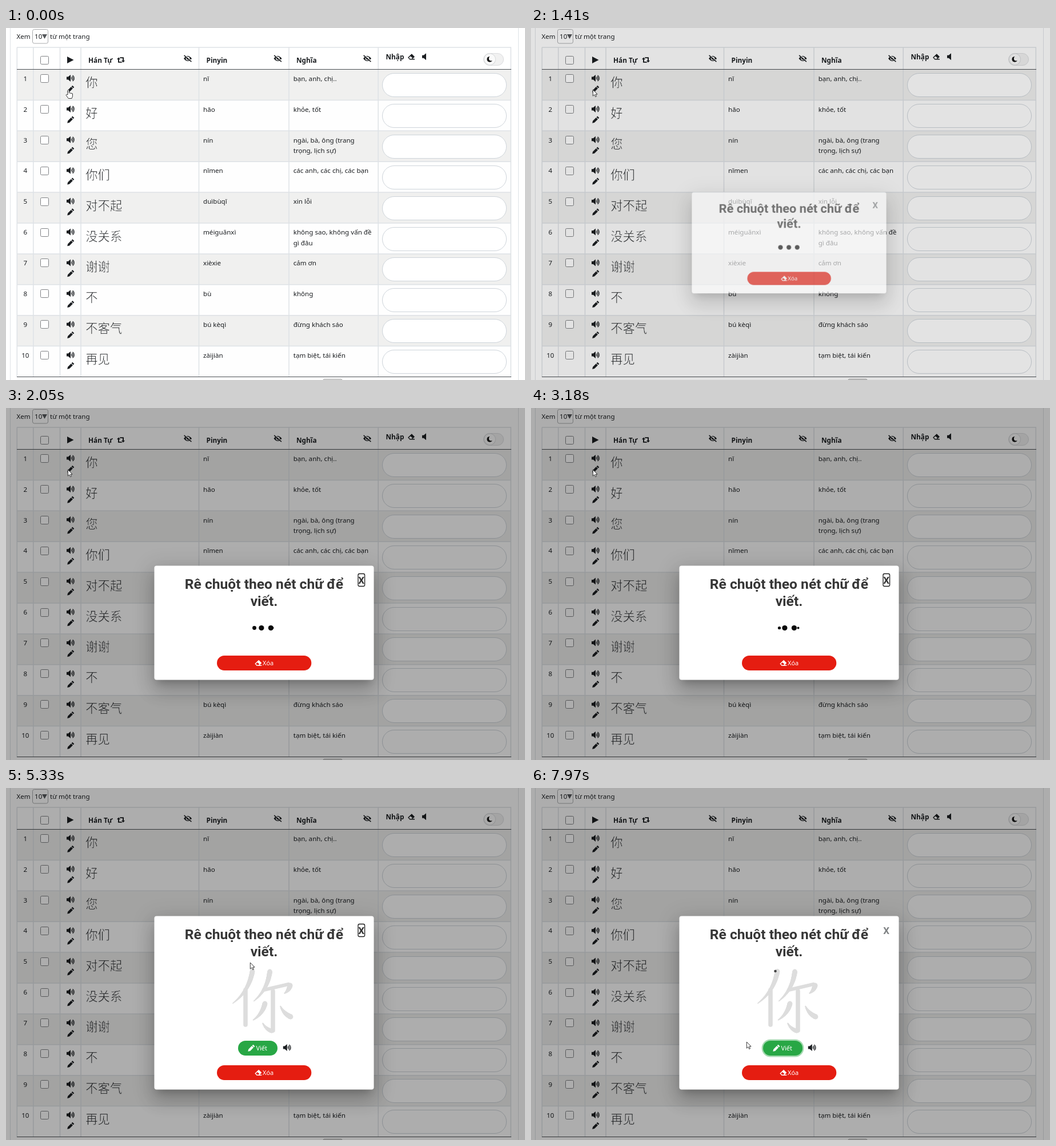
These frames come from a looping animation (908 by 617 pixels, 7990 ms). An HTML page with a canvas:

```html
<!DOCTYPE html>
<html lang="vi">
<head>
<meta charset="utf-8">
<title>Hán Tự</title>
<style>
html, body { margin: 0; width: 100%; height: 100%; overflow: hidden; background: #fff; }
canvas { display: block; }
</style>
</head>
<body>
<canvas id="stage" width="908" height="617"></canvas>
<script>
const W = 908, H = 617, LOOP = 7990, ROW = 53.9;
const stage = document.getElementById('stage').getContext('2d');
const layer = Object.assign(document.createElement('canvas'), { width: W, height: H }).getContext('2d');
let g = stage;

const INK = '#1b1e21', LINE = '#dee2e6', STRIPES = ['#f0f0ef', '#fefefe'];
const SANS = '"Noto Sans", "Open Sans", sans-serif';
const BODY = '11.6px ' + SANS, BOLD = 'bold 11.8px ' + SANS, SMALL = '10.9px ' + SANS;
const HAN = '300 21.3px "Noto Sans CJK SC", "Noto Sans CJK", sans-serif';
const TITLE = 'bold 24.6px Roboto, sans-serif', CLOSE = 'bold 17px Roboto, sans-serif';
const OPEN = 1368, FOCUS = 1530, LOADED = 3680, PRESS = 6900;
const CX = 451.5, CY = 376.5, DW = 384, ZOOM = 0.82;

const words = [
  ['你', 'nǐ', 'bạn, anh, chị..'],
  ['好', 'hǎo', 'khỏe, tốt'],
  ['您', 'nín', 'ngài, bà, ông (trang', 'trọng, lịch sự)'],
  ['你们', 'nǐmen', 'các anh, các chị, các bạn'],
  ['对不起', 'duìbùqǐ', 'xin lỗi'],
  ['没关系', 'méiguānxì', 'không sao, không vấn đề', 'gì đâu'],
  ['谢谢', 'xièxie', 'cảm ơn'],
  ['不', 'bù', 'không'],
  ['不客气', 'bú kèqì', 'đừng khách sáo'],
  ['再见', 'zàijiàn', 'tạm biệt, tái kiến']
];

// ---- timing helpers ----
const clamp = v => Math.max(0, Math.min(1, v));
const ramp = (t, start, length) => clamp((t - start) / length);
const mix = (a, b, p) => a + (b - a) * p;
const curve = (a, b, c, p) => mix(mix(a, b, p), mix(b, c, p), p);

function bezier(x, x1, y1, x2, y2) {
  if (x <= 0 || x >= 1) return clamp(x);
  const at = (s, a, b) => 3 * (1 - s) * (1 - s) * s * a + 3 * (1 - s) * s * s * b + s * s * s;
  let lo = 0, hi = 1;
  for (let i = 0; i < 24; i++) {
    const s = (lo + hi) / 2;
    if (at(s, x1, x2) < x) lo = s; else hi = s;
  }
  return at(lo, y1, y2);
}

// ---- drawing helpers ----
function text(s, x, y, font = BODY, color = INK, align = 'left') {
  g.font = font;
  g.fillStyle = color;
  g.textAlign = align;
  g.fillText(s, x, y);
}

function box(x, y, w, h, r, fill, stroke, width = 1) {
  g.beginPath();
  g.roundRect(x, y, w, h, r);
  if (fill) { g.fillStyle = fill; g.fill(); }
  if (stroke) { g.strokeStyle = stroke; g.lineWidth = width; g.stroke(); }
}

function line(x1, y1, x2, y2, color, width) {
  g.beginPath();
  g.moveTo(x1, y1);
  g.lineTo(x2, y2);
  g.strokeStyle = color;
  g.lineWidth = width;
  g.stroke();
}

function disc(x, y, r, color) {
  g.beginPath();
  g.arc(x, y, Math.max(0, r), 0, 7);
  g.fillStyle = color;
  g.fill();
}

function shape(path, x, y, fill, stroke, turn = 0) {
  g.save();
  g.translate(x, y);
  g.rotate(turn);
  g.fillStyle = fill;
  g.fill(path);
  if (stroke) {
    g.strokeStyle = stroke;
    g.lineWidth = 0.9;
    g.lineJoin = 'round';
    g.stroke(path);
  }
  g.restore();
}

// ---- icons ----
const horn = new Path2D('M0 3.5H2.8L7 0V12L2.8 8.5H0Z');
const pen = new Path2D('M0 0 3.4-2.1H11.6V2.1H3.4ZM12.6-2.1H15V2.1H12.6Z');
const rubber = new Path2D('M0 6.8 6.8.2 12 5.6 8.4 9H12V10.4H3.4Z');
const notch = new Path2D('M1.8 7.1 4.6 4.4 8 7.6 6.6 9H4Z');
const eye = new Path2D('M0 6Q7-3 14 6Q7 15 0 6Z');
const play = new Path2D('M0 0 11.5 6 0 12Z');
const half = new Path2D('M-7-1-4-4.4-1-1H-3V3H1L2.6 4.8H-5V-1Z');
const arrow = new Path2D('M0 0V11.2L2.6 8.8 4.4 12.6 6.2 11.8 4.5 8.1H7.8Z');
const hand = new Path2D('M0 9V1.5Q1.2-1.3 2.4 1.5V5.6L8.4 7V12L7 15.5H1.2L-3 9.6-2 8.3Z');

function speaker(x, y) {
  shape(horn, x, y, INK);
  g.strokeStyle = INK;
  g.lineWidth = 1.3;
  for (let r = 2; r < 7; r += 2.1) {
    g.beginPath();
    g.arc(x + 7, y + 6, r, -0.95, 0.95);
    g.stroke();
  }
}

const pencil = (x, y, color) => shape(pen, x, y, color, null, -Math.PI / 4);

function eraser(x, y, color, hole) {
  shape(rubber, x, y, color);
  shape(notch, x, y, hole);
}

function hiddenEye(x, y) {
  shape(eye, x, y, INK);
  disc(x + 7, y + 6, 3.3, '#fff');
  disc(x + 7, y + 6, 2.1, INK);
  line(x + 2, y, x + 14, y + 10.6, '#fff', 1.6);
  line(x + 0.6, y + 0.4, x + 13.4, y + 11.6, INK, 1.5);
}

const checkbox = y => box(60.5, Math.round(y) + 0.5, 14, 14, 2, '#fff', '#808285');

// ---- page ----
function header() {
  text('Xem', 18.5, 19);
  box(46.5, 2.5, 27, 24.5, 3, '#fff', '#a9abad');
  text('10', 50, 19);
  shape(new Path2D('M0 0H9L4.5 8Z'), 63, 11, '#55585b');
  text('từ một trang', 77, 19);

  checkbox(49);
  shape(play, 107, 50, INK);
  text('Hán Tự', 144, 60.5, BOLD);
  shape(half, 201, 56, INK);
  shape(half, 201, 56, INK, null, Math.PI);
  text('Pinyin', 350.5, 60.5, BOLD);
  text('Nghĩa', 508, 60.5, BOLD);
  [311, 468.5, 625].forEach(x => hiddenEye(x, 47.5));
  text('Nhập', 664.5, 54.5, BOLD);
  eraser(703, 45, INK, '#fff');
  shape(horn, 728, 44.2, INK);

  box(835.5, 44.5, 35, 21, 10.5, '#f1f1f1', '#dcdddf');
  disc(846.5, 54.8, 10.5, '#d6d8da');
  disc(846.5, 54.8, 9.6, '#fafafa');
  disc(846.3, 54.8, 4.9, '#111');
  disc(848.8, 53.4, 4, '#fafafa');
}

function wordRow([han, sound, ...sense], i) {
  const y = i * ROW, paper = STRIPES[i % 2];
  text(String(i + 1), 33.8, y + 92.7, BODY, INK, 'center');
  checkbox(y + 81);
  speaker(106, y + 82);
  pencil(107.2, y + 112.8, INK);
  text(han, 139.3, y + 103, HAN);
  // A paper-coloured outline slims the characters.
  g.strokeStyle = paper;
  g.lineWidth = 0.7;
  g.strokeText(han, 139.3, y + 103);
  text(sound, 345, y + 92.7);
  sense.forEach((s, k) => text(s, 502.7, y + 92.7 + k * 18.4));
  box(658.5, Math.round(y + 79) + 0.5, 217, 41, 20.5, '#fff', '#ced4da');
}

function page() {
  g.fillStyle = '#fff';
  g.fillRect(0, 0, W, H);
  [7.5, 896.5].forEach(x => line(x, 0, x, H, LINE, 1));
  words.forEach((w, i) => {
    g.fillStyle = STRIPES[i % 2];
    g.fillRect(19, 72.5 + i * ROW, 864.5, ROW);
  });
  const rule = (y, color, width) => line(19, y, 884, y, color, width);
  rule(34, LINE, 1.5);
  for (let i = 1; i < 10; i++) rule(72.5 + i * ROW, LINE, 1.5);
  [19.3, 47.8, 94.5, 131, 337.5, 495, 651.2, 883.3].forEach(x => line(x, 34, x, 611.5, LINE, 1.5));
  [72.5, 611.5].forEach(y => rule(y, '#4b4f54', 1.2));
  box(555, 615.5, 33, 10, 2, '#ebebeb', '#9a9a9a');
  header();
  words.forEach(wordRow);
}

// ---- dialog ----
// A bowed brush mark that thins towards its end.
function sweep(x0, y0, x1, y1, r = 4.4) {
  const bend = 0.2;
  const cx = (x0 + x1) / 2 + bend * (y1 - y0), cy = (y0 + y1) / 2 - bend * (x1 - x0);
  for (let p = 0; p <= 1; p += 1 / 60) {
    disc(curve(x0, cx, x1, p), curve(y0, cy, y1, p), mix(r, 0.8, Math.pow(p, 1.3)), '#ddd');
  }
}

function glyph() {
  g.lineCap = 'round';
  line(419, 354, 419, 415, '#ddd', 7.6);
  line(451, 354, 494, 344, '#ddd', 6.4);
  line(467, 356, 467, 425, '#ddd', 7.6);
  g.lineCap = 'butt';
  sweep(431, 321.5, 396, 378);
  sweep(461.5, 322, 433, 374);
  sweep(497, 346, 487, 360);
  sweep(465, 426, 449, 412, 3.6);
  sweep(453, 378, 432, 407);
  sweep(498, 401, 480, 382);
}

function dots(t, y) {
  const p = bezier(Math.max(0, t - 1468) % 600 / 600, 0, 1, 1, 0);
  const left = 434.5, gap = 16.5, r = 4.6, color = '#0a0a0a';
  disc(left, y, r * p, color);
  disc(left + gap * p, y, r, color);
  disc(left + gap * (1 + p), y, r, color);
  disc(left + gap * 2, y, r * (1 - p), color);
}

function writer(t) {
  if (t < 7040 || t >= 7100) {
    g.globalAlpha = ramp(t, 3700, 200);
    glyph();
    g.globalAlpha = 1;
  }
  disc(427.5, 321, 2.3 * ramp(t, 7840, 130), '#444');

  const ring = ramp(t, 6920, 150), s = 2.4 * ring;
  const dark = ramp(t, 6640, 150) - ramp(t, 7650, 150);
  if (ring) box(406 - s, 443 - s, 69 + 2 * s, 26 + 2 * s, 13 + s, `rgba(72,180,97,${ring / 2})`);
  box(406, 443, 69, 26, 13, `rgb(${mix(40, 33, dark)},${mix(167, 136, dark)},${mix(69, 56, dark)})`);
  pencil(423.3, 461.8, '#fff');
  text('Viết', 437.5, 460, SMALL, '#fff');
  speaker(484.8, 449);
}

function shadow(x, y, w, h, drop, blur, spread, alpha) {
  const far = 3000, grow = spread * ZOOM;
  g.save();
  g.beginPath();
  g.rect(0, 0, W, H);
  g.roundRect(x, y, w, h, 4);
  g.clip('evenodd');
  g.shadowColor = `rgba(0,0,0,${alpha})`;
  g.shadowBlur = blur * ZOOM;
  g.shadowOffsetX = far;
  g.shadowOffsetY = drop * ZOOM;
  box(x - grow - far, y - grow, w + 2 * grow, h + 2 * grow, 4, '#000');
  g.restore();
}

function panel(t, h) {
  const top = CY - h / 2, bottom = top + h, focused = t >= FOCUS && t < PRESS;
  box(CX - DW / 2, top, DW, h, 4, '#fff');
  text('Rê chuột theo nét chữ để', CX, top + 40, TITLE, '#363636', 'center');
  text('viết.', CX, top + 70, TITLE, '#363636', 'center');
  text('X', 621.7, top + 31.5, CLOSE, focused ? '#333' : '#7f8284', 'center');
  if (focused) box(616, top + 14, 11.6, 22, 2.5, null, '#1c1c1c', 1.3);
  if (t < LOADED) dots(t, top + 109); else writer(t);
  box(369, bottom - 42.5, 165.3, 26, 13, '#e51d11');
  eraser(435.3, bottom - 35, '#fff', '#e51d11');
  text('Xóa', 449, bottom - 25.7, SMALL, '#fff');
}

function dialog(t) {
  const p = bezier(ramp(t, OPEN, 150), 0, 0, 0.2, 1), scale = 0.7 + 0.3 * p;
  const h = t < LOADED ? 200 : 304;
  const frameBox = [CX - DW / 2 * scale, CY - h / 2 * scale, DW * scale, h * scale];
  shadow(...frameBox, 11, 15, -7, 0.2 * p);
  shadow(...frameBox, 24, 38, 3, 0.14 * p);
  shadow(...frameBox, 9, 46, 8, 0.12 * p);

  g = layer;
  g.clearRect(0, 0, W, H);
  panel(t, h);
  g = stage;
  g.save();
  g.globalAlpha = p;
  g.translate(CX, CY);
  g.scale(scale, scale);
  g.drawImage(layer.canvas, -CX, -CY);
  g.restore();
}

// ---- pointer ----
const legs = [
  { from: 4400, to: 5150, x: 406, y: 294 },
  { from: 5220, to: 5330, x: 427, y: 306 },
  { from: 5380, to: 6040, x: 432, y: 393 },
  { from: 6140, to: 6700, x: 437, y: 449 },
  { from: 7300, to: 7970, x: 377, y: 445 }
];

function pointerAt(t) {
  return legs.reduce(([x, y], leg) => {
    const p = ramp(t, leg.from, leg.to - leg.from);
    return [mix(x, leg.x, p), mix(y, leg.y, p)];
  }, [108, 108]);
}

function pointer(t) {
  const [x, y] = pointerAt(t);
  if (t >= 500 && t < 800) {
    g.beginPath();
    g.arc(107.5, 108.5, 66 - 13 * Math.floor((t - 500) / 60), 0, 7);
    g.strokeStyle = 'rgba(128,128,128,.5)';
    g.lineWidth = 3;
    g.stroke();
  }
  const pressed = start => t >= start && t < start + 160;
  if (pressed(1070) || pressed(PRESS)) disc(x, y + 0.3, 8.5, 'rgba(235,222,0,.8)');
  const overButton = t > LOADED && x >= 406 && x <= 475 && y >= 443 && y <= 469;
  if (t < OPEN || overButton) shape(hand, x, y, '#fff', '#222');
  else shape(arrow, x + 0.3, y, '#fff', '#222');
}

function draw(t) {
  page();
  if (t >= OPEN) {
    g.fillStyle = `rgba(0,0,0,${0.32 * bezier(ramp(t, OPEN, 400), 0.25, 0.8, 0.25, 1)})`;
    g.fillRect(0, 0, W, H);
    dialog(t);
  }
  pointer(t);
}

let began;
function tick(now) {
  began ??= now;
  draw((now - began) % LOOP);
  requestAnimationFrame(tick);
}
requestAnimationFrame(tick);
</script>
</body>
</html>
```
